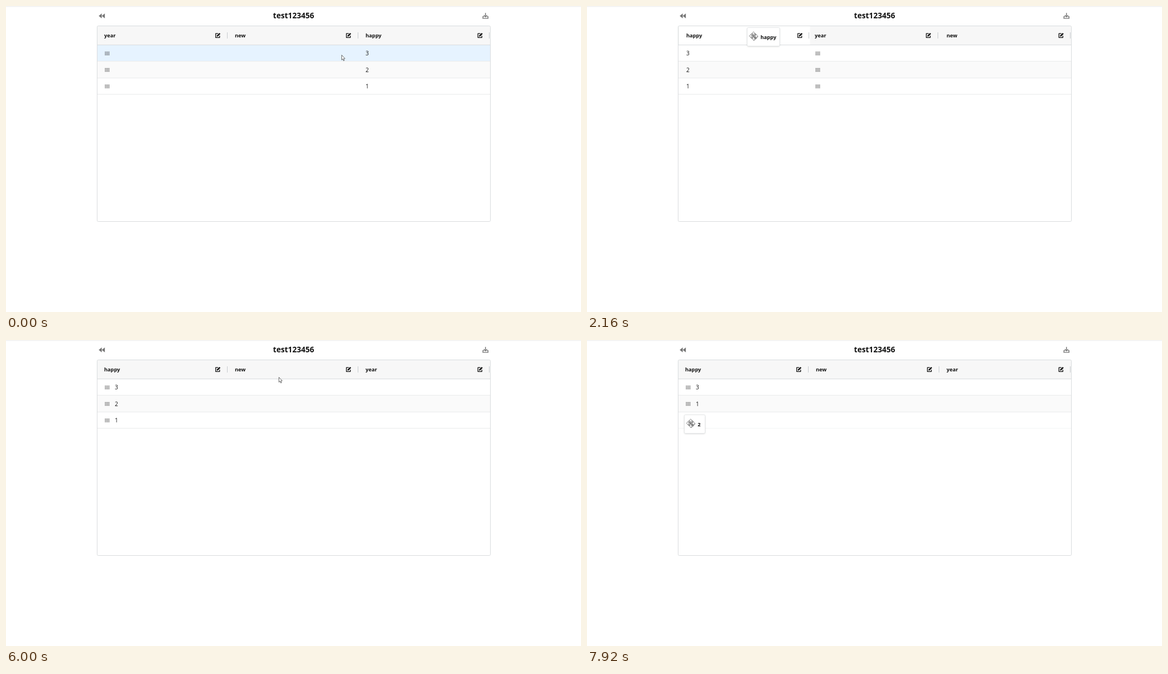
An HTML page with a canvas that plays this animation: 1025x546 px, repeating every 8 s.

```html
<!DOCTYPE html>
<html lang="en">
<head>
<meta charset="utf-8">
<title>Table drag</title>
<style>
html, body { margin: 0; width: 100%; height: 100%; overflow: hidden; background: #fff; }
canvas { display: block; }
</style>
</head>
<body>
<canvas id="stage" width="1025" height="546"></canvas>
<script>
const ctx = document.getElementById('stage').getContext('2d');
const LOOP = 8000, STEP = 80, SLIDE = 200;
const FONT = '"Open Sans", "Noto Sans", sans-serif';
const LEFT = 163, COL_W = 233, ROW_TOP = 69.7, ROW_H = 29.4;
const DARK = '#111', GREY = '#757575', EDGE = '#d9dcde';

const COLUMNS = ['year', 'new', 'happy'];
// Each swap exchanges a column with its right neighbour
const SWAPS = [{ at: 1700, slot: 1 }, { at: 1973, slot: 0 }, { at: 4640, slot: 1 }];
const DRAGS = [
  { from: 1520, to: 2480, label: 'happy', w: 59 },
  { from: 4640, to: 5360, label: 'new', w: 51 },
  { from: 7440, to: LOOP, label: '2', w: 38, row: true }
];
// Pointer moves: start, end, then where it arrives
const MOVES = [
  [0, 480, 682, 53], [800, 960, 695, 53], [1440, 2160, 297, 54], [2160, 2320, 241, 58],
  [2880, 3280, 415, 64], [3280, 3840, 709, 63], [4080, 4240, 712, 54], [4560, 4880, 611, 57],
  [4880, 5360, 540, 59], [5920, 6480, 163, 108], [6880, 7280, 182, 114], [7360, 7920, 185, 149]
];

const lerp = (a, b, u) => a + (b - a) * u;
const clamp = u => Math.max(0, Math.min(1, u));
const ease = u => u < .5 ? 2 * u * u : 1 - 2 * (1 - u) * (1 - u);

function pointer(t) {
  let x = 598, y = 87;
  for (const [from, to, toX, toY] of MOVES) {
    const u = clamp((t - from) / (to - from));
    x = lerp(x, toX, u);
    y = lerp(y, toY, u);
  }
  return { x, y };
}

function columnLeft(name, t) {
  let slot = COLUMNS.indexOf(name), shown = slot;
  for (const swap of SWAPS) {
    if (slot === swap.slot) slot++;
    else if (slot === swap.slot + 1) slot--;
    shown = lerp(shown, slot, ease(clamp((t - swap.at) / SLIDE)));
    if (t < swap.at + SLIDE) break;
  }
  return LEFT + COL_W * shown;
}

function rect(x, y, w, h, color) {
  ctx.fillStyle = color;
  ctx.fillRect(x, y, w, h);
}

function text(str, x, y, size, weight = 400, align = 'left') {
  ctx.font = `${weight} ${size}px ${FONT}`;
  ctx.textAlign = align;
  ctx.fillStyle = DARK;
  ctx.fillText(str, x, y);
}

function trace(points) {
  ctx.beginPath();
  points.forEach(([x, y]) => ctx.lineTo(x, y));
}

function line(points, color, width) {
  trace(points);
  ctx.strokeStyle = color;
  ctx.lineWidth = width;
  ctx.stroke();
}

function poly(points, fill, stroke) {
  trace(points);
  ctx.closePath();
  ctx.fillStyle = fill;
  ctx.fill();
  if (!stroke) return;
  ctx.strokeStyle = stroke;
  ctx.lineWidth = .8;
  ctx.stroke();
}

function at(x, y, draw) {
  ctx.save();
  ctx.translate(x, y);
  draw();
  ctx.restore();
}

function editIcon(x, y) {
  at(x, y, () => {
    ctx.lineJoin = 'round';
    line([[.4, -3.2], [-4, -3.2], [-4, 4], [3, 4], [3, .8]], DARK, 1.3);
    line([[-1.2, 1.3], [3.6, -3.5]], DARK, 2.5);
    poly([[-2.2, 2.3], [-1.9, .1], [.1, 2]], DARK);
  });
}

function handle(x, y) {
  for (let i = 0; i < 4; i++)
    for (let j = 0; j < 4; j++)
      rect(x - 4 + i * 2.2, y - 3.2 + j * 1.8, 1.1, 1.1, '#333');
}

function topBar() {
  rect(0, 0, 1025, 1.5, '#f1f1f1');
  for (const x of [165.3, 170.8]) poly([[x, 17.7], [x + 5.4, 13.3], [x + 5.4, 22.1]], GREY);
  text('test123456', 512.6, 22, 13.6, 700, 'center');
  at(854.7, 17.6, () => {
    line([[-2.6, 1.4], [-4.6, 1.4], [-4.6, 4.6], [4.6, 4.6], [4.6, 1.4], [2.6, 1.4]], GREY, 1.3);
    line([[0, -5.2], [0, 1]], GREY, 1.5);
    line([[-3, -1.2], [0, 1.8], [3, -1.2]], GREY, 1.4);
  });
}

function arrow({ x, y }) {
  at(x, y, () => poly(
    [[.4, .5], [.4, 9.2], [2.3, 7.5], [3.7, 10.7], [5.1, 10.1], [3.7, 7], [6.3, 6.8]], '#fff', '#444'));
}

// Four arrowheads pointing outwards, together a diamond
function fourWay(x, y, r, color) {
  at(x, y, () => {
    for (let k = 0; k < 4; k++) {
      ctx.rotate(Math.PI / 2);
      poly([[r, 0], [r - 3.6, -3.6], [r - 3.6, -1.1], [1.1, -1.1], [1.1, 1.1], [r - 3.6, 1.1], [r - 3.6, 3.6]], '#fff', color);
    }
  });
}

function ghost(drag, m) {
  const x = Math.round(m.x - 12.3) + .5, y = Math.round(m.y - 15.8) + .5;
  ctx.save();
  ctx.shadowColor = 'rgba(0,0,0,.16)';
  ctx.shadowBlur = 3;
  ctx.shadowOffsetY = 1;
  ctx.beginPath();
  ctx.roundRect(x, y, drag.w - 1, 33, 2);
  ctx.fillStyle = '#fff';
  ctx.fill();
  ctx.restore();
  ctx.strokeStyle = '#dfe1e3';
  ctx.lineWidth = .8;
  ctx.stroke();
  fourWay(m.x + 1, m.y + .8, 6.8, '#555');
  fourWay(m.x - .2, m.y - .5, 7.6, '#666');
  text(drag.label, x + 23.7, y + 20, 9.2, 700);
}

function rows(t, m, drag) {
  const values = t < 7600 ? ['3', '2', '1'] : ['3', '1', '2'];
  const hover = drag || m.x < 161 ? -1 : Math.floor((m.y - ROW_TOP) / ROW_H);
  const holder = t < 2480 ? 'year' : 'happy';
  const holderX = columnLeft(holder, t), happyX = columnLeft('happy', t);
  values.forEach((value, i) => {
    const y = ROW_TOP + i * ROW_H, mid = y + ROW_H / 2, odd = i % 2;
    const plain = odd ? '#fafafa' : '#fff', lit = odd ? '#e2effb' : '#e6f3ff';
    ctx.save();
    if (drag && drag.row && value === drag.label) ctx.globalAlpha = .5;
    rect(LEFT, Math.round(y), 700, 29, i === hover ? lit : plain);
    rect(LEFT, Math.round(y + ROW_H) - 1, 700, 1, '#eaebec');
    handle(holderX + 17.5, mid + .2);
    text(value, happyX + (holder === 'happy' ? 31 : 12), mid + 3.8, 10);
    ctx.restore();
  });
  if (t >= 7200 && t < 7440) {
    ctx.strokeStyle = '#2196f3';
    ctx.lineWidth = 1;
    ctx.strokeRect(LEFT + .5, 99.5, COL_W - 1, 28);
  }
}

function header(t, drag) {
  rect(LEFT, 36, 700, 33, '#f7f7f7');
  const moving = drag && !drag.row ? drag.label : '';
  const names = [...COLUMNS].sort((a, b) => (a === moving) - (b === moving));
  for (const name of names) {
    const x = columnLeft(name, t);
    const extra = 1.5 * clamp((x - LEFT) / COL_W - 1);
    if (name === moving) rect(x - .5, 36, COL_W + extra, 33, '#fff');
    text(name, x + 12, 55.5, 9.2, 700);
    editIcon(x + 214.8 + extra, 52.3);
    rect(Math.round(x + 230.5 + extra), 47, 1, 11, '#c8cccf');
  }
  rect(LEFT, 69, 700, 1, EDGE);
}

function frame(now) {
  const t = Math.floor((now % LOOP) / STEP) * STEP;
  const m = pointer(t);
  const drag = DRAGS.find(d => t >= d.from && t < d.to);
  rect(0, 0, 1025, 546, '#fff');
  topBar();
  ctx.save();
  ctx.beginPath();
  ctx.rect(LEFT, 36, 700, 348);
  ctx.clip();
  rows(t, m, drag);
  header(t, drag);
  ctx.restore();
  ctx.beginPath();
  ctx.roundRect(LEFT - .5, 35.5, 701, 349, 2);
  ctx.strokeStyle = EDGE;
  ctx.lineWidth = 1;
  ctx.stroke();
  if (drag) ghost(drag, m);
  else arrow(m);
}

const start = performance.now();
function tick() {
  frame(performance.now() - start);
  requestAnimationFrame(tick);
}
tick();
</script>
</body>
</html>
```
